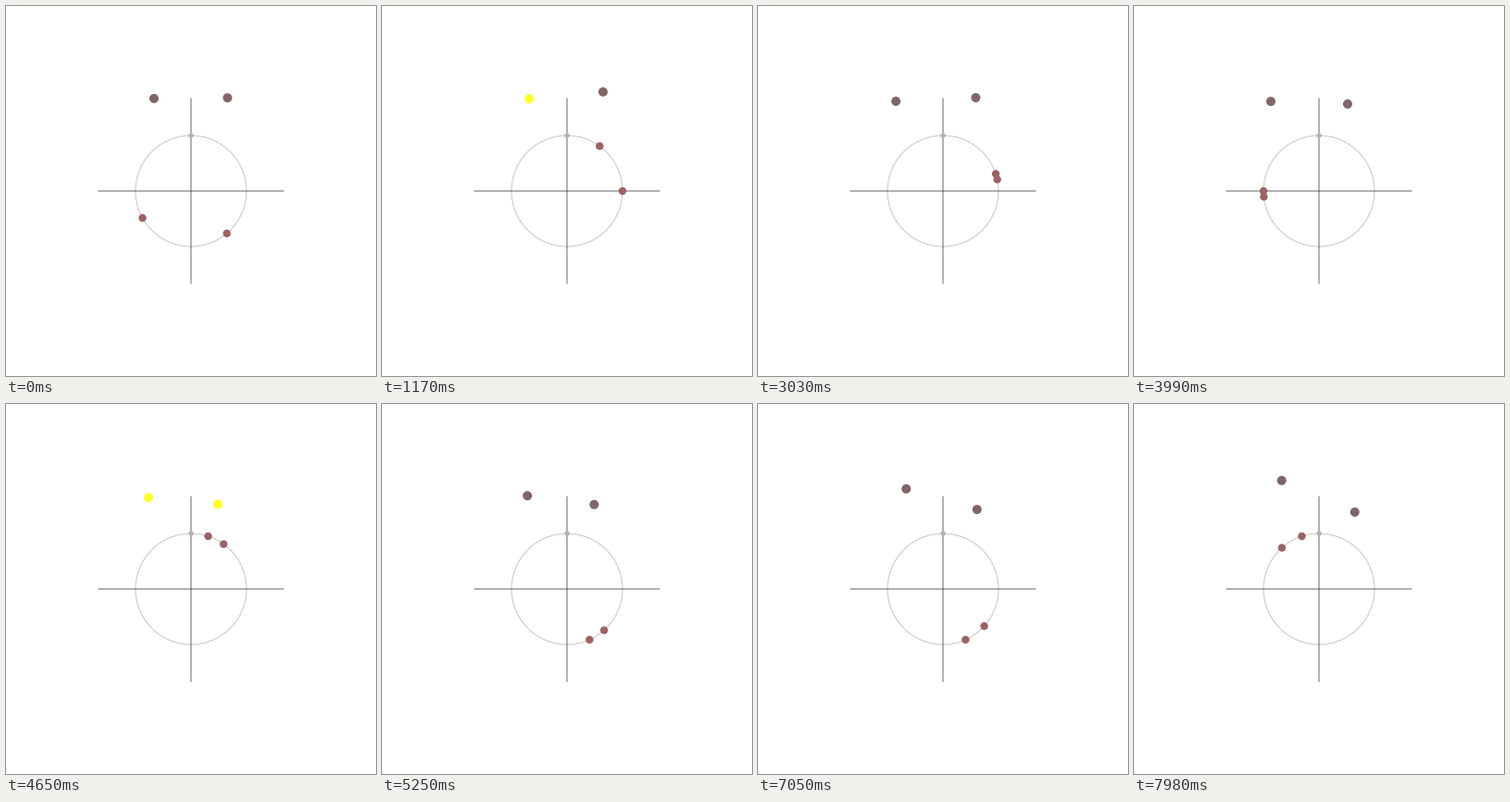
These frames come from a looping animation (400 by 400 pixels, 8 s). A matplotlib script:

```python
import numpy as np
import matplotlib.pyplot as plt
from matplotlib.animation import FuncAnimation
from matplotlib.patches import Circle

SIZE, DPI = 400, 100
FRAMES, STEP = 267, 8000 / 267
CENTER, RADIUS, ARM = 200, 60, 100
CYCLE, NUDGE, GLOW = 60, 4, 10

BODY = "#806666"
FLASH = "#ffff30"
HAND = "#9b6363"
PX = 72 / DPI


def run_clocks():
    """Two coupled clocks: each flash nudges the other toward it."""
    ticks, glow = [23.3, 40.15], [0, 0]
    phases, lit = [], []
    for n in range(FRAMES):
        if n:
            for i in (0, 1):
                ticks[i] += 1
                glow[i] = max(0, glow[i] - 1)
                if ticks[i] >= CYCLE:
                    ticks[i], glow[i] = 0, GLOW
                    ticks[1 - i] += NUDGE if ticks[1 - i] > CYCLE / 2 else -NUDGE
        phases.append(tuple(ticks))
        lit.append(tuple(g > 0 for g in glow))
    return phases, lit


def bump(n, mid, width):
    return np.exp(-((n - mid) / width) ** 2 / 2)


def flutter(rng):
    """Random walk that keeps pulling back to zero."""
    walk = np.zeros((FRAMES, 2))
    for n in range(1, FRAMES):
        walk[n] = 0.8 * walk[n - 1] + rng.uniform(-0.4, 0.4, 2)
    return walk


rng = np.random.default_rng(4)
n = np.arange(FRAMES)
u = n / (FRAMES - 1)
sway = bump(n, 118, 30)
left = np.column_stack([160 - 13.5 * sway,
                        100 + 3.5 * sway - 17.5 * u ** 6])
right = np.column_stack([239.5 - 10 * bump(n, 160, 48),
                         100.5 + 16.5 * u ** 1.5 - 10.5 * bump(n, 62, 30)])
paths = [path + flutter(rng) for path in (left, right)]
phases, lit = run_clocks()

fig = plt.figure(figsize=(SIZE / DPI, SIZE / DPI), dpi=DPI, facecolor="white")
ax = fig.add_axes([0, 0, 1, 1])
ax.set(xlim=(0, SIZE), ylim=(SIZE, 0))
ax.axis("off")


def disc(x, y, r, color, z):
    return ax.add_patch(Circle((x, y), r, fc=color, lw=0, zorder=z))


ax.add_patch(Circle((CENTER, CENTER), RADIUS, fill=False, ec="0.78",
                    lw=PX, zorder=1))
ends, mid = [CENTER - ARM, CENTER + ARM], [CENTER, CENTER]
for x, y in ((ends, mid), (mid, ends)):
    ax.plot(x, y, color="black", alpha=0.6, lw=PX, solid_capstyle="round",
            snap=False, zorder=2)
disc(CENTER, CENTER - RADIUS, 2.7, "0.7", 3)

bodies = [disc(0, 0, 5, BODY, 5) for _ in paths]
hands = [disc(0, 0, 4.2, HAND, 4) for _ in paths]


def draw(frame):
    for i, (body, hand) in enumerate(zip(bodies, hands)):
        body.center = tuple(paths[i][frame])
        body.set_facecolor(FLASH if lit[frame][i] else BODY)
        angle = 2 * np.pi * phases[frame][i] / CYCLE
        hand.center = (CENTER + RADIUS * np.sin(angle),
                       CENTER - RADIUS * np.cos(angle))
    return bodies + hands


anim = FuncAnimation(fig, draw, frames=FRAMES, interval=STEP,
                     repeat=True, repeat_delay=0, blit=False)
plt.show()
```
